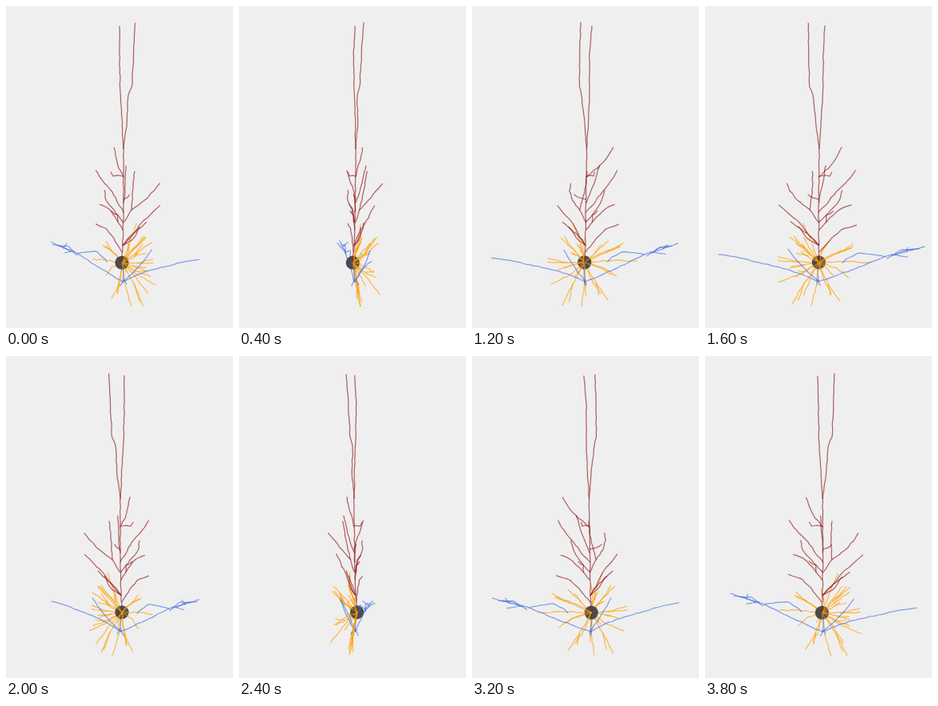
An HTML page with a canvas for the animation above (4000 ms loop, 284 px wide and 403 px high).

```html
<!DOCTYPE html>
<html lang="en">
<head>
<meta charset="utf-8">
<title>Rotating neuron</title>
<style>
html, body { margin: 0; width: 100%; height: 100%; overflow: hidden; background: #efefef; }
canvas { display: block; }
</style>
</head>
<body>
<canvas id="stage" width="284" height="403"></canvas>
<script>
const ctx = document.getElementById('stage').getContext('2d');
const LOOP = 4000, STEP = 200, CX = 145, CY = 200, CAMERA = 2000;
const RED = 'rgba(139,12,16,.62)', BLUE = 'rgba(65,105,225,.62)', ORANGE = 'rgba(255,160,0,.68)';
const SOMA = [0, 4.5, 321];
const lines = [];

let seed = 11;
function rand() {
  seed = (seed * 16807) % 2147483647;
  return seed / 2147483647;
}
const wobble = a => (rand() - 0.5) * a;
const mix = (a, b, t) => a.map((v, i) => v + (b[i] - v) * t);

// Points are [x, z, y]: z points to the viewer, y is the stage row.
function branch(color, rough, ...pts) {
  const out = [pts[0]];
  for (let i = 1; i < pts.length; i++) {
    const a = pts[i - 1], b = pts[i];
    const n = Math.max(1, Math.round(Math.hypot(b[0] - a[0], b[1] - a[1], b[2] - a[2]) / 5));
    for (let k = 1; k <= n; k++) {
      const p = mix(a, b, k / n);
      out.push(k < n ? p.map(v => v + wobble(rough)) : p);
    }
  }
  lines.push({ color, pts: out, tip: pts[pts.length - 1] });
}

// Basal dendrites
const tips = [
  [-37, -53, 320], [-13, -22, 368], [12, 4, 375], [26, 25, 373], [41, 34, 346],
  [38, 40, 319], [-24, -34, 301], [37, 2, 296], [18, 13, 272], [-20, -40, 297],
  [-20, -31, 339], [36, 5, 338], [-5, -15, 360], [26, 22, 288], [32, -8, 360],
  [28, 30, 329], [5, -33, 335], [30, 10, 309], [30, -5, 289], [10, -30, 293]
];
tips.forEach((tip, i) => {
  const mid = mix(SOMA, tip, 0.5).map(v => v + wobble(6));
  branch(ORANGE, 1.6, SOMA, mid, tip);
  if (i % 2) {
    const end = mix(SOMA, tip, 0.88);
    branch(ORANGE, 1.6, mid, [end[0] + wobble(14), end[1] + wobble(14), end[2] + wobble(14)]);
  }
});

// Axon
const hub = [1, 3, 345];
branch(BLUE, 1.2, SOMA, [2, 4, 334], hub);
branch(BLUE, 1.2, hub, [14, 14, 338], [30, 31, 330], [55, 56, 322], [77, 78, 315], [92, 93, 312]);
branch(BLUE, 1.2, hub, [-14, -14, 337], [-37, -37, 325], [-57, -57, 313], [-74, -75, 307], [-92, -92, 300]);
branch(BLUE, 1.2, [-57, -57, 313], [-44, -46, 310], [-32, -34, 309], [-25, -24, 315], [-19, -20, 321]);
branch(BLUE, 1.2, [-66, -66, 311], [-78, -72, 305], [-90, -84, 303]);
branch(BLUE, 1.2, [-82, -82, 304], [-70, -74, 304], [-58, -60, 315]);
branch(BLUE, 1.2, [-76, -76, 307], [-72, -83, 301]);
branch(BLUE, 1.2, [-62, -63, 310], [-74, -80, 313]);
branch(BLUE, 1.2, hub, [9, 5, 338], [24, 12, 322], [31, 16, 313], [37, 19, 304]);
branch(BLUE, 1.2, [-2, 4, 350], [3, 4, 342], [6, 0, 348]);

// Apical trunk and tuft
const fork = [2, 1, 178];
branch(RED, 0.9, SOMA, [1, 3, 300], [2, 2.5, 260], [2, 1.5, 215], fork);
branch(RED, 1, fork, [6, 2, 150], [8, 6, 112], [12.5, 7, 101], [14.5, 6, 60], [16.5, 4, 22]);
branch(RED, 1, fork, [0, -1, 140], [-2, -1.4, 108], [-3, -1, 60], [-3, -4.3, 25]);

// Oblique dendrites
branch(RED, 1.3, [2, 1, 214], [-4, -11, 203], [-7, -22, 191], [-10, -30, 177]);
branch(RED, 1.3, [1, 1, 213], [-5, -3, 212], [-11, -4, 213], [-14, -4, 208]);
branch(RED, 1.3, [2, 2, 258], [-5, -7, 247], [-12, -15, 233], [-25, -23, 218], [-33, -28, 206]);
branch(RED, 1.3, [1, 2, 270], [-5, -4, 262], [-13, -9, 252], [-20, -12, 243], [-22, -15, 231]);
branch(RED, 1.3, [1, 2, 280], [-8, -8, 265], [-17, -18, 254], [-28, -26, 249]);
branch(RED, 1.3, [0, 3, 308], [-10, -8, 291], [-19, -17, 280], [-33, -30, 274]);
branch(RED, 1.3, [2, 2, 271], [12, 7, 255], [28, 11, 243], [40, 11, 231], [47, 7, 222]);
branch(RED, 1.3, [12, 7, 255], [13, 2, 238], [14, -2, 225], [16, -4, 207]);
branch(RED, 1.3, [1, 3, 300], [5, 4, 296], [15, 8, 284], [28, 14, 267], [47, 24, 249]);
branch(RED, 1.3, [1, 3, 299], [10, 9, 288], [20, 15, 279], [30, 23, 270]);
branch(RED, 1.3, [2, 3, 299], [12, 8, 293], [18, 12, 285], [22, 18, 276]);
branch(RED, 1.3, [2, 1, 246], [4, -5, 232], [4, -11, 218], [5, -17, 200]);
branch(RED, 1.3, [2, 2, 242], [6, 9, 240], [9, 15, 236]);
branch(RED, 1.3, [-5, -4, 270], [-5, -4, 262], [-13, -8, 257]);

function project([x, z, y], c, s) {
  const k = 1 / (1 - (z * c + x * s) / CAMERA);
  return [CX + (x * c - z * s) * k, CY + (y - CY) * k];
}

function stroke(line, c, s) {
  ctx.strokeStyle = line.color;
  ctx.beginPath();
  for (const p of line.pts) ctx.lineTo(...project(p, c, s));
  ctx.stroke();
}

function drawSoma(c, s) {
  const [x, y] = project(SOMA, c, s);
  ctx.fillStyle = 'rgba(62,62,64,.92)';
  ctx.beginPath();
  ctx.arc(x, y, 8.6, 0, Math.PI * 2);
  ctx.fill();
}

function draw(angle) {
  const c = Math.cos(angle), s = Math.sin(angle);
  const near = l => l.tip[1] * c + l.tip[0] * s > 0;
  ctx.fillStyle = '#efefef';
  ctx.fillRect(0, 0, 284, 403);
  ctx.lineWidth = 1.25;
  ctx.lineJoin = ctx.lineCap = 'round';
  lines.filter(l => !near(l)).forEach(l => stroke(l, c, s));
  drawSoma(c, s);
  lines.filter(near).forEach(l => stroke(l, c, s));
}

function tick() {
  const step = Math.floor((performance.now() % LOOP) / STEP);
  draw(step * STEP / LOOP * Math.PI * 2);
  requestAnimationFrame(tick);
}
tick();
</script>
</body>
</html>
```
